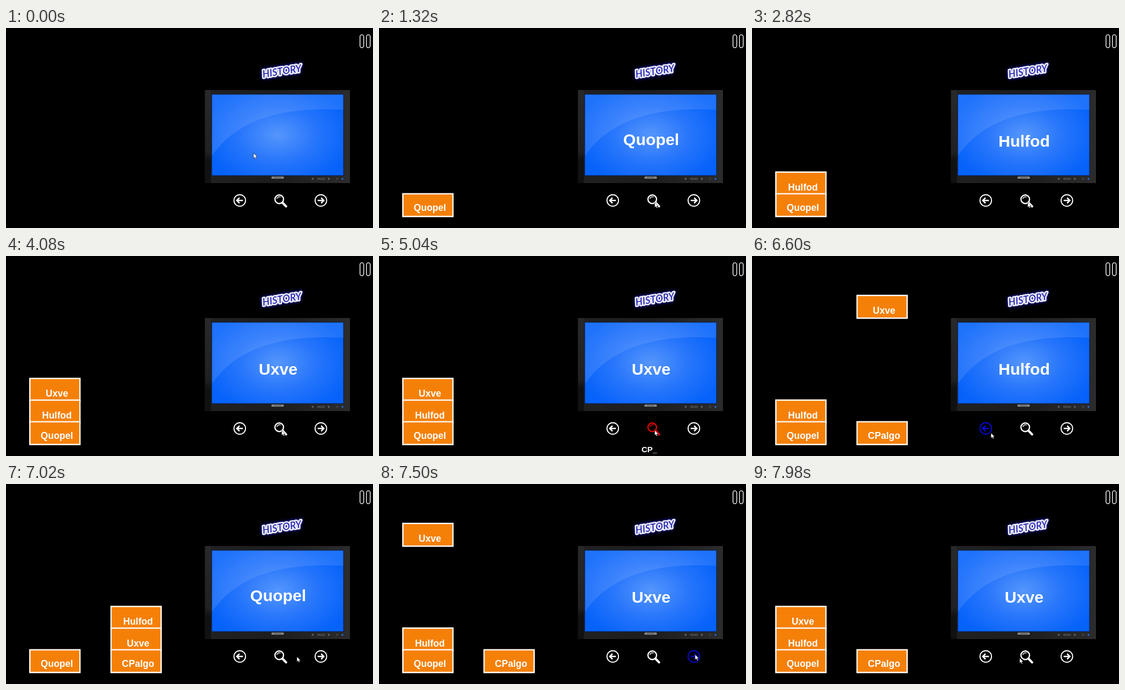
Recreate the animation shown at these times as an HTML page. Size 685 by 374 pixels, loop 8 s.

```html
<!DOCTYPE html>
<html lang="en">
<head>
<meta charset="utf-8">
<title>Browser history stacks</title>
<style>
  html, body { margin: 0; width: 100%; height: 100%; overflow: hidden; background: #000; }
  #stage { position: relative; width: 685px; height: 374px; overflow: hidden; }
  svg { position: absolute; left: 0; top: 0; }
  text, .block { font-family: "Liberation Sans", Arial, sans-serif; font-weight: bold; fill: #fff; }
  #page { font-size: 30.3px; text-anchor: middle; }
  #typed { font-size: 15px; }
  .menu { font-size: 5px; fill: #606164; }
  .title {
    font: italic 700 18.5px Lato, sans-serif; text-anchor: middle;
    fill: #2a2ab4; stroke: #fff; stroke-width: 5px; stroke-linejoin: round; paint-order: stroke;
    filter: drop-shadow(0 0 3px #1414d0);
  }
  .button { color: #fff; fill: none; stroke: currentColor; }
  .block {
    position: absolute; left: 0; top: 0; width: 95.4px; height: 44.2px; box-sizing: border-box;
    padding: 17.4px 0 0 7px; border: 2px solid #fff; box-shadow: 0 0 0 .5px #fff; background: #f58008;
    color: #fff; font-size: 17.5px; line-height: 20px; text-align: center; white-space: nowrap;
  }
  .block.tail { padding-top: 15.3px; }
</style>
</head>
<body>
<div id="stage">
  <svg width="685" height="374" viewBox="0 0 685 374">
    <defs>
      <linearGradient id="bezel">
        <stop offset="0" stop-color="#212122"/>
        <stop offset=".5" stop-color="#1d1d1e"/>
        <stop offset="1" stop-color="#2c2c2d"/>
      </linearGradient>
      <linearGradient id="edge" x2="0" y2="1">
        <stop offset="0" stop-color="#29292b"/>
        <stop offset=".66" stop-color="#212122"/>
        <stop offset=".76" stop-color="#111112"/>
      </linearGradient>
      <radialGradient id="screen" gradientUnits="userSpaceOnUse" cx="507" cy="200" r="140"
        gradientTransform="translate(0 60) scale(1 .7)">
        <stop offset="0" stop-color="#5596fc"/>
        <stop offset=".5" stop-color="#2876fb"/>
        <stop offset="1" stop-color="#0562fa"/>
      </radialGradient>
      <circle id="ring" r="10.8" stroke-width="1.9"/>
      <path id="arrow" d="M6 0H-5M-.5-5L-5.5 0L-.5 5" stroke-width="2.6"/>
    </defs>

    <g fill="none" stroke="#fff" stroke-width="1.4">
      <rect x="660.7" y="12.6" width="7" height="24.2" rx="3.5"/>
      <rect x="672.7" y="12.6" width="7" height="24.2" rx="3.5"/>
    </g>
    <text class="title" transform="translate(516 87.3) rotate(-9)">HISTORY</text>

    <rect x="371.5" y="116" width="270.5" height="174" fill="url(#bezel)"/>
    <rect x="371.5" y="116" width="11" height="174" fill="url(#edge)"/>
    <rect x="384" y="124" width="246" height="152" fill="url(#screen)" stroke="#0a1c48"/>
    <path d="M384.5 124.5H629.5V153C545 148 440 158 384.5 239Z" fill="#fff" fill-opacity=".1"/>
    <rect x="495.5" y="277.7" width="23" height="4" rx="1.5" fill="#8c8c8c"/>
    <path d="M500 279.7h14" stroke="#444"/>
    <g fill="#606164">
      <path d="M574 279.5v5l-4.5-2.5zM601 279.5v5l4.5-2.5z"/>
      <text class="menu" x="581" y="284">MENU</text>
      <circle cx="618" cy="282" r="1.7" fill="none" stroke="#555" stroke-width=".8"/>
    </g>
    <circle cx="628" cy="282" r="1.6" fill="#267cff"/>

    <g id="back" class="button" transform="translate(436.3 322.5)">
      <use href="#ring"/><use href="#arrow"/>
    </g>
    <g id="forward" class="button" transform="translate(587.7 322.5)">
      <use href="#ring"/><use href="#arrow" transform="scale(-1 1)"/>
    </g>
    <g id="search" class="button">
      <circle cx="510" cy="320.3" r="8" stroke-width="2.4"/>
      <path d="M505.5 319.5A5 5 0 0 1 512.5 316" stroke-width="1.4"/>
      <path d="M516 326.5L522.8 333.6" stroke-width="4.2" stroke-linecap="round"/>
    </g>

    <text id="page" x="508"></text>
    <text id="typed" x="490" y="366.5"></text>
  </svg>
  <div id="blocks"></div>
  <svg width="685" height="374" viewBox="0 0 685 374">
    <path id="cursor" d="M0 0V9.6L2.2 7.6L3.8 11L5.4 10.2L3.9 7H7Z" fill="#fff" stroke="#111" stroke-width=".6"/>
  </svg>
</div>
<script>
  const LOOP = 8000, TICK = 60, TYPE_DELAY = 240, LIFT_Y = 73;

  const actions = [
    { kind: "search", name: "Quopel", click: 300, at: 1320 },
    { kind: "search", name: "Hulfod", click: 1740, at: 2640 },
    { kind: "search", name: "Uxve", click: 3120, at: 4080 },
    { kind: "search", name: "CPalgo", click: 4380, at: 5580 },
    { kind: "back", at: 6240 },
    { kind: "back", at: 6540 },
    { kind: "back", at: 6720 },
    { kind: "forward", at: 7200 },
    { kind: "forward", at: 7440 }
  ];
  const searches = actions.filter(a => a.kind === "search");

  const cursorHome = { x: 462, y: 234 };
  const glides = [
    { from: 0, to: 120, x: 514.5, y: 326 },
    { from: 5760, to: 6120, x: 446, y: 331 },
    { from: 6960, to: 7100, x: 590, y: 319 },
    { from: 7560, to: 7740, x: 527, y: 326 },
    { from: 7920, to: 7980, x: 499.5, y: 325.5 }
  ];

  const el = id => document.getElementById(id);
  const hasTail = name => /[gpqy]/.test(name);
  const clamp = p => Math.max(0, Math.min(1, p));
  const easeOut = p => 1 - (1 - p) ** 2;
  const stackX = side => 43.8 + side * 151.5;
  const levelY = level => 309.2 - level * 40.5;

  const blocks = {};
  for (const { name } of searches) {
    const div = blocks[name] = document.createElement("div");
    div.className = hasTail(name) ? "block tail" : "block";
    div.textContent = name;
    el("blocks").append(div);
  }

  // Replays the history up to t: the two stacks and the block moved last.
  function replay(t) {
    const stacks = [[], []];
    let moved = null;
    for (const { kind, name, at } of actions) {
      if (at > t) break;
      if (kind === "search") {
        stacks[0].push(name);
        continue;
      }
      const side = kind === "back" ? 1 : 0;
      const top = stacks[1 - side].pop();
      stacks[side].push(top);
      moved = { name: top, phase: Math.floor((t - at) / TICK) };
    }
    return { stacks, moved };
  }

  // A moved block is lifted, carried across, then set down.
  function drawStacks({ stacks, moved }) {
    for (const div of Object.values(blocks)) div.style.visibility = "hidden";
    stacks.forEach((stack, side) => stack.forEach((name, level) => {
      const phase = moved && moved.name === name ? moved.phase : 2;
      const x = stackX(phase < 1 ? 1 - side : side);
      const y = phase < 2 ? LIFT_Y : levelY(level);
      const { style } = blocks[name];
      style.visibility = "visible";
      style.zIndex = 5 - level;
      style.transform = `translate(${x}px, ${y}px)`;
    }));
  }

  // Typing starts slowly and speeds up until shortly before the search is sent.
  function prompt(t) {
    const search = searches.find(s => t >= s.click && t < s.at);
    if (!search) return "";
    const { name, click, at } = search;
    const p = (t - click - TYPE_DELAY) / (at - click - 2 * TYPE_DELAY);
    const count = p < 0 ? 0 : 1 + Math.floor((name.length - 1) * clamp(p) ** 1.8);
    return name.slice(0, count) + "_";
  }

  function cursorAt(t) {
    let { x, y } = cursorHome;
    for (const glide of glides) {
      const p = easeOut(clamp((t - glide.from) / (glide.to - glide.from)));
      x += (glide.x - x) * p;
      y += (glide.y - y) * p;
    }
    return `translate(${x} ${y})`;
  }

  const pressed = (kind, t) =>
    actions.some(a => a.kind === kind && t >= a.at - 2 * TICK && t < a.at + 3 * TICK);

  function render(now) {
    const t = Math.floor(now % LOOP / TICK) * TICK;
    const state = replay(t);
    drawStacks(state);

    const page = state.stacks[0].at(-1) || "";
    el("page").textContent = page;
    el("page").setAttribute("y", hasTail(page) ? 219 : 222);

    const typed = prompt(t);
    el("typed").textContent = typed;
    el("search").style.color = typed ? "#e00008" : "#fff";
    for (const kind of ["back", "forward"])
      el(kind).style.color = pressed(kind, t) ? "#0808d8" : "#fff";

    el("cursor").setAttribute("transform", cursorAt(t));
  }

  const begin = performance.now();
  function tick() {
    render(performance.now() - begin);
    requestAnimationFrame(tick);
  }
  tick();
</script>
</body>
</html>
```
